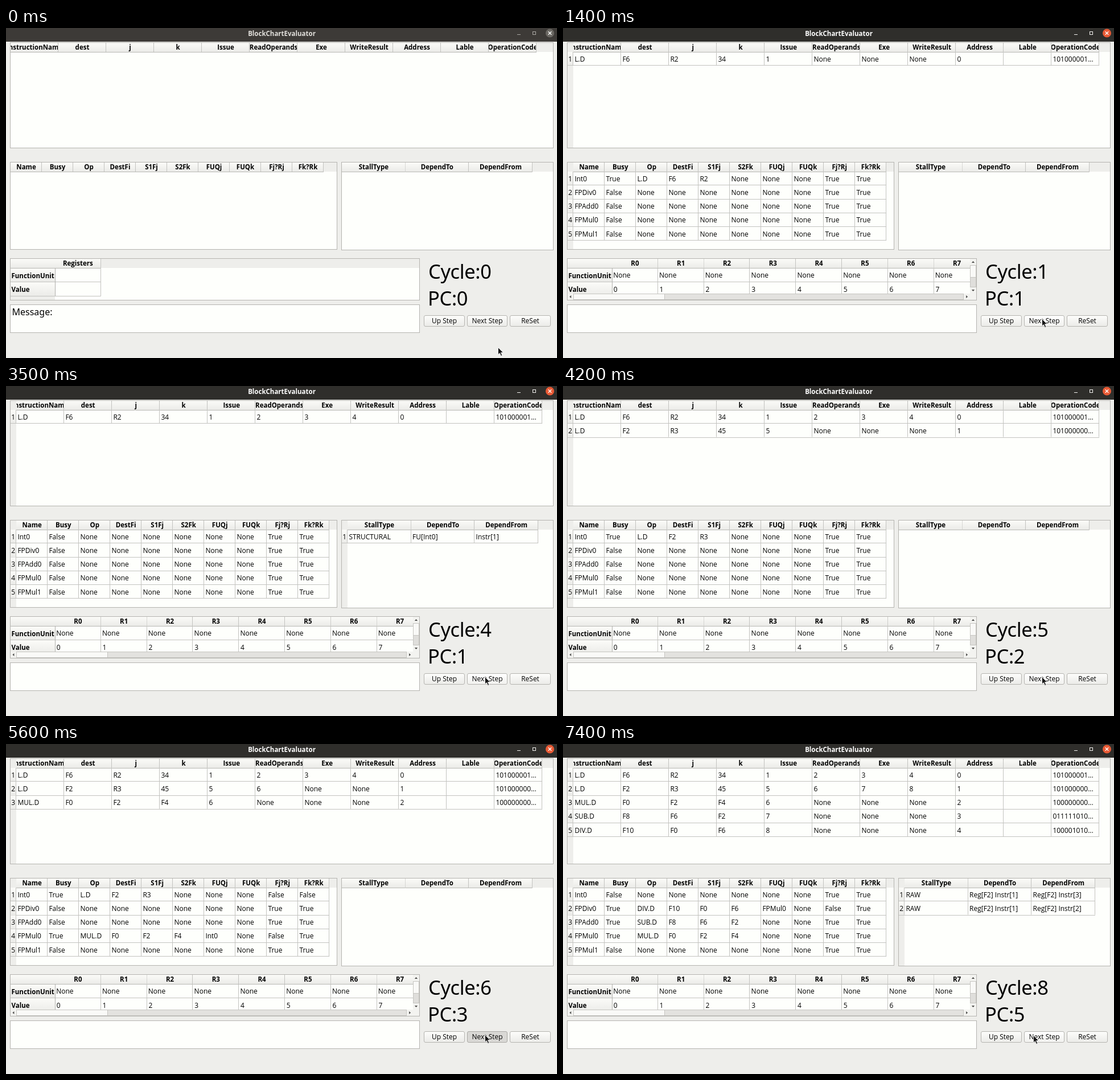
These frames come from a looping animation (968x579 px, 8000 ms). An HTML page:

```html
<!DOCTYPE html>
<html lang="en">
<head>
<meta charset="utf-8">
<title>BlockChartEvaluator</title>
<style>
  html, body { margin: 0; width: 100%; height: 100%; overflow: hidden; background: #eeeeeb; }
  svg { display: block; }
  text { font: 500 12px "Open Sans", "Noto Sans", sans-serif; fill: #000; white-space: pre; }
  .head { font-size: 11.5px; font-weight: 700; }
  .mid { text-anchor: middle; }
  .title { fill: #fff; }
  .idle { fill: #e2e0dc; }
  .message { font: 16px "Noto Sans", sans-serif; }
  .big { font: 34.5px "Noto Sans", "Open Sans", sans-serif; letter-spacing: -.4px; }
</style>
</head>
<body>
<svg width="968" height="579" viewBox="0 0 968 579">
  <defs>
    <linearGradient id="cap" x2="0" y2="1"><stop stop-color="#fbfbf8"/><stop offset="1" stop-color="#ebebe8"/></linearGradient>
    <linearGradient id="btn" x2="0" y2="1"><stop stop-color="#fdfdfb"/><stop offset="1" stop-color="#ebebe8"/></linearGradient>
    <linearGradient id="hover" x2="0" y2="1"><stop stop-color="#fff"/><stop offset="1" stop-color="#f1f1ee"/></linearGradient>
  </defs>
  <g id="app"></g>
  <path id="cursor" d="M.5 .5V13L3.4 10.4L5.6 15.4L7.8 14.4L5.6 9.6H9.6Z" fill="#151515" stroke="#fff" stroke-width=".8"/>
</svg>
<script>
const LOOP = 8000, ROW = 24.25;
const PAPER = '#fefffc', FACE = '#eeeeeb', EDGE = '#b5b4b0', GRID = '#c3c3c0';
const app = document.getElementById('app');
const cursor = document.getElementById('cursor');

// [time, cycle]
const cycles = [[0, 0], [1400, 1], [2100, 2], [2800, 3], [3500, 4], [4200, 5], [5000, 6], [5800, 7], [7400, 8]];
// [time, x, y]
const moves = [
  [0, 864, 560], [600, 853, 536], [700, 843, 517], [800, 839, 509], [1000, 841, 510],
  [6500, 786, 430], [6600, 721, 349], [6800, 729, 356], [7000, 752, 395],
  [7100, 800, 470], [7200, 824, 509], [7300, 826, 511]
];
// [time, button look]
const looks = [
  [0, 'btn'], [700, 'hover'], [1900, 'down'], [2100, 'hover'], [2700, 'down'], [2800, 'hover'],
  [4100, 'down'], [4200, 'hover'], [4900, 'down'], [5000, 'hover'], [5600, 'down'], [5800, 'hover'],
  [6500, 'btn'], [7200, 'hover'], [7300, 'down'], [7400, 'hover']
];

// instruction fields, cycles in which its stages finish, operation code
const program = [
  ['L.D F6 R2 34', [1, 2, 3, 4], '101000001...'],
  ['L.D F2 R3 45', [5, 6, 7, 8], '101000000...'],
  ['MUL.D F0 F2 F4', [6], '100000000...'],
  ['SUB.D F8 F6 F2', [7], '011111010...'],
  ['DIV.D F10 F0 F6', [8], '100001010...']
];
const instrHeads = 'InstructionName dest j k Issue ReadOperands Exe WriteResult Address Lable OperationCode'.split(' ');
const unitHeads = 'Name Busy Op DestFi S1Fj S2Fk FUQj FUQk Fj?Rj Fk?Rk'.split(' ');
const stallHeads = ['StallType', 'DependTo', 'DependFrom'];

const at = (list, t) => list.filter(e => e[0] <= t).pop();
const range = n => [...Array(n).keys()];
const text = (s, x, y, cls = '') => `<text class="${cls}" x="${x}" y="${y}">${s}</text>`;
const rect = (x, y, w, h, fill, more = '') => `<rect x="${x}" y="${y}" width="${w}" height="${h}" fill="${fill}" ${more}/>`;
const line = (x1, y1, x2, y2, color = GRID) => `<path d="M${x1} ${y1}L${x2} ${y2}" stroke="${color}"/>`;
const panel = (x, y, w, h) => rect(x + .5, y + .5, w - 1, h - 1, PAPER, `stroke="${EDGE}"`);
const snap = v => Math.round(v) - .5;

function clipped(x, y, w, h, body) {
  return `<svg x="${x}" y="${y}" width="${w}" height="${h}" overflow="hidden">${body}</svg>`;
}

function heading(label, x, y, w) {
  return rect(x, y, w, 16, 'url(#cap)') +
    clipped(x, y, w - 1, 16, text(label, w / 2, 12.2, 'head mid')) +
    line(snap(x + w), y, snap(x + w), y + 16) + line(x, y + 16.5, x + w, y + 16.5, '#b9b9b5');
}

function table(x, y, w, h, heads, colW, rows) {
  const left = x + 1 + (rows.length ? 10.2 : 0), top = y + 17;
  const right = left + heads.length * colW;
  let out = panel(x, y, w, h) + rect(x + 1, y + 1, w - 2, 16, FACE);
  heads.forEach((s, i) => out += heading(s, left + i * colW, y + 1, colW));
  if (!rows.length) return out;
  out += rect(x + 1, top, 10, h - 18, FACE);
  rows.forEach((cells, r) => {
    const ry = top + r * ROW, end = snap(ry + ROW), base = ry + 16.5;
    out += rect(x + 1, ry, 10, ROW, 'url(#cap)') + text(r + 1, x + 5.8, base, 'mid');
    out += line(x + 1, end, right, end);
    cells.forEach((s, i) => out += text(s, left + i * colW + 2.2, base));
  });
  const bottom = top + rows.length * ROW - 1;
  range(heads.length + 1).forEach(i => {
    const cx = snap(left + i * colW);
    out += line(cx, top, cx, bottom);
  });
  return out;
}

function instructions(c) {
  return program.filter(p => p[1][0] <= c).map(([fields, stamps, code], i) => [
    ...fields.split(' '),
    ...range(4).map(k => stamps[k] <= c ? stamps[k] : 'None'),
    i, '', code
  ]);
}

function units(c) {
  if (!c) return [];
  const idle = 'False None None None None None None True True';
  const load = c < 5 ? 'F6 R2' : 'F2 R3';
  const ready = c === 1 || c === 5 ? 'True True' : 'False False';
  return [
    'Int0 ' + (c % 4 ? `True L.D ${load} None None None ${ready}` : idle),
    'FPDiv0 ' + (c < 8 ? idle : 'True DIV.D F10 F0 F6 FPMul0 None False True'),
    'FPAdd0 ' + (c < 7 ? idle : 'True SUB.D F8 F6 F2 None ' + (c < 8 ? 'Int0 True False' : 'None True True')),
    'FPMul0 ' + (c < 6 ? idle : 'True MUL.D F0 F2 F4 ' + (c < 8 ? 'Int0 None False True' : 'None None True True')),
    'FPMul1 ' + idle
  ].map(s => s.split(' '));
}

function stalls(c) {
  const raw = n => ['RAW', 'Reg[F2] Instr[1]', `Reg[F2] Instr[${n}]`];
  if (c > 1 && c < 5) return [['STRUCTURAL', 'FU[Int0]', 'Instr[1]']];
  return c === 7 ? [raw(2)] : c === 8 ? [raw(3), raw(2)] : [];
}

function scrollbars() {
  const arrow = (x, y, turn) => `<path d="M-2.6 1.4L0 -1.6L2.6 1.4Z" fill="#4a4a48" transform="translate(${x} ${y}) rotate(${turn})"/>`;
  const box = (x, y, w, h, fill) => rect(x, y, w, h, fill, 'stroke="#c6c5c1"');
  return rect(715, 405, 11, 61, '#f3f3f0') + rect(8, 466, 718, 11, '#f3f3f0') +
    box(715.5, 416.5, 10, 38, '#dfdedb') + box(715.5, 416.5, 10, 21, '#f9f9f7') +
    box(18.5, 466.5, 685, 10, '#e3e2df') + box(18.5, 466.5, 160, 10, '#f9f9f7') +
    arrow(720.5, 410.5, 0) + arrow(720.5, 460.5, 180) + arrow(13, 471.5, -90) + arrow(709.5, 471.5, 90);
}

function registers(c) {
  const colW = 80.8, n = c ? 8 : 1;
  let body = rect(8, 405, 718, 16, FACE) + rect(8, 405, 78, 16, 'url(#cap)') + rect(8, 421, 78, 56, FACE);
  range(n).forEach(i => {
    const x = 86 + i * colW, end = snap(x + colW);
    body += heading(c ? 'R' + i : 'Registers', x, 405, colW) + line(end, 422, end, 470);
    if (c) body += text('None', x + 2.2, 438.3) + text(i, x + 2.8, 462.6);
  });
  ['FunctionUnit', 'Value'].forEach((s, i) => {
    const y = 422 + i * ROW, end = snap(y + ROW);
    body += rect(8, y, 78, ROW, 'url(#cap)') + text(s, 9.5, y + 17.2, 'head');
    body += line(8, end, 86 + n * colW, end);
  });
  body += line(8, 421.5, 86, 421.5, '#b9b9b5') + line(86.5, 421, 86.5, 470, '#b0b0ac');
  const view = c ? [707, 61] : [718, 72];
  return panel(7, 404, 720, 74) +
    `<svg x="8" y="405" width="${view[0]}" height="${view[1]}" viewBox="8 405 ${view}" overflow="hidden">${body}</svg>` +
    (c ? scrollbars() : '');
}

function button(label, x, w, look) {
  const fill = look === 'down' ? '#d9d8d5' : `url(#${look})`;
  return rect(x + .5, 504.5, w - 1, 19, fill, `rx="2.5" stroke="${look === 'down' ? '#a9a8a4' : EDGE}"`) +
    text(label, x + w / 2, 518.4, 'mid');
}

function titleBar(active) {
  const ink = active ? '#f4f3f0' : '#aaa8a3';
  return rect(0, 0, 968, 24, active ? '#2f2e2b' : '#3d3a37') +
    text('BlockChartEvaluator', 484.5, 13.6, 'head mid ' + (active ? 'title' : 'title idle')) +
    line(898, 11.5, 904, 11.5, ink) + rect(925.5, 6.5, 5, 5, 'none', `stroke="${ink}"`) +
    `<circle cx="955.5" cy="9" r="7.5" fill="${active ? '#e95a35' : '#6b6863'}"/>` +
    '<path d="M952.7 6.2l5.6 5.6m0-5.6l-5.6 5.6" stroke="#fff" stroke-width="1.3"/>';
}

function draw(c, look, active) {
  app.innerHTML = rect(0, 0, 968, 579, FACE) +
    table(7, 25, 955, 186, instrHeads, 84, instructions(c)) +
    titleBar(active) +
    table(7, 235, 575, 154, unitHeads, 55, units(c)) +
    table(589, 235, 373, 155, stallHeads, 111.6, stalls(c)) +
    registers(c) +
    panel(7, 485, 720, 50) + (c ? '' : text('Message:', 10.5, 504, 'message')) +
    text('Cycle:' + c, 742, 440, 'big') +
    text('PC:' + program.filter(p => p[1][0] <= c).length, 741, 487, 'big') +
    button('Up Step', 734, 72, 'btn') + button('Next Step', 810, 71, look) + button('ReSet', 885, 72, 'btn');
}

const start = performance.now();
let shown = '';
function tick() {
  const t = (performance.now() - start) % LOOP;
  const c = at(cycles, t)[1], look = at(looks, t)[1], active = t >= 1300;
  const [, x, y] = at(moves, t);
  const key = [c, look, active].join();
  if (key !== shown) draw(c, look, active);
  shown = key;
  cursor.setAttribute('transform', `translate(${x} ${y})`);
  requestAnimationFrame(tick);
}
tick();
</script>
</body>
</html>
```
